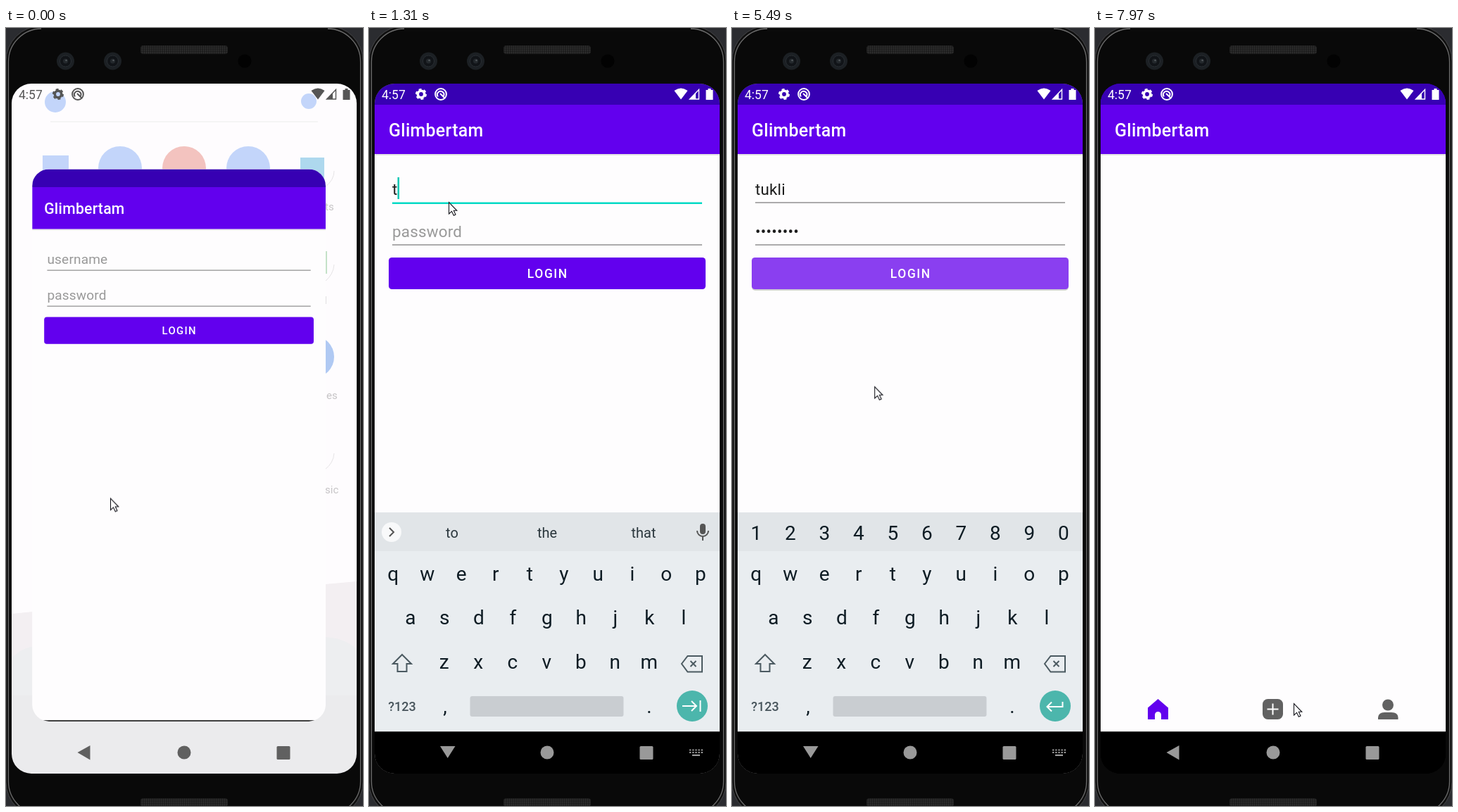
Write an HTML page that moves like this. It is 507x1105 px and loops after 8000 ms.

```html
<!DOCTYPE html>
<html lang="en">
<head>
<meta charset="utf-8">
<title>Login demo</title>
<style>
html, body { margin: 0; width: 100%; height: 100%; overflow: hidden; background: #2b2c30; }
body { position: relative; font-family: Roboto, sans-serif; }
svg { position: absolute; left: 0; top: 0; width: 507px; height: 1105px; }
.screen, .window { position: absolute; width: 490px; height: 980px; overflow: hidden; border-radius: 28px; }
.screen { left: 8px; top: 79px; background: #000; }
.screen svg { left: -8px; top: -79px; }
.window { left: 0; top: 0; transform-origin: 0 0; background: #fefdfe; }
.keys { position: absolute; left: 0; top: 0; width: 490px; height: 920px; overflow: hidden; }
.launcher, .login, .feed, #keyboard, .status, .nav, #button, .mouse { animation: 8s linear infinite; }

.title { font: 500 24.9px Roboto, sans-serif; letter-spacing: .3px; fill: #fff; }
.field { font-size: 22.4px; letter-spacing: .2px; }
.hint { fill: #999; }
.caption { font: 500 17.46px Roboto, sans-serif; letter-spacing: 1.56px; fill: #fff; }
.line { fill: none; stroke: #909090; stroke-width: 1.4; }
.line.focus { stroke: #03dac5; stroke-width: 2.6; transform: translateY(.7px); }
.caret { fill: #03c8b5; }
.centre { text-anchor: middle; }
.key { font-size: 28px; fill: #0e1c24; }
.stroke { fill: none; stroke: currentColor; stroke-width: 2; }

.launcher { animation-name: launcher; }
@keyframes launcher { 0%, 3.6% { opacity: 1; } 3.7%, 100% { opacity: 0; } }
.login { animation-name: login; }
@keyframes login {
  0% { transform: translate(29.5px, 122.7px) scale(.849); height: 921.5px; animation-timing-function: cubic-bezier(.2, .6, .2, 1); }
  3.6% { transform: none; height: 980px; }
  84.375% { transform: none; height: 980px; animation-timing-function: cubic-bezier(.3, 0, .8, .15); }
  85.21% { transform: translate(-4.9px, -9.8px) scale(1.02); height: 980px; animation-timing-function: cubic-bezier(.05, .7, .1, 1); }
  89.375%, 100% { transform: translate(-12.25px, -24.5px) scale(1.05); height: 980px; }
}
.feed { border-radius: 0; box-shadow: 0 0 3px rgba(0, 0, 0, .5); animation-name: feed; }
@keyframes feed {
  0%, 84.375% { transform: translate(36.75px, 73.5px) scale(.85); animation-timing-function: cubic-bezier(.3, 0, .8, .15); }
  85.21% { transform: translate(22.05px, 44.1px) scale(.91); animation-timing-function: cubic-bezier(.05, .7, .1, 1); }
  89.375%, 100% { transform: none; }
  0%, 85% { opacity: 0; }
  86%, 100% { opacity: 1; }
}
#keyboard { animation-name: keyboard; }
@keyframes keyboard {
  0%, 12.6% { transform: translateY(312px); animation-timing-function: cubic-bezier(0, 0, .2, 1); }
  15.8%, 83.6% { transform: none; animation-timing-function: cubic-bezier(.4, 0, 1, 1); }
  85.6%, 100% { transform: translateY(312px); }
}
.status { animation-name: status; }
@keyframes status { 0%, 1.2% { color: #555; } 3%, 100% { color: #fff; } }
.nav { animation-name: nav; }
@keyframes nav { 0%, 1% { color: #606060; } 5%, 13% { color: #d8d8d8; } 16%, 100% { color: #999; } }
#button { animation-name: button; }
@keyframes button {
  0%, 49.6% { fill: #6200ee; }
  49.9%, 78.9% { fill: #8a3ff0; }
  83.6%, 100% { fill: #6200ee; }
}
.mouse { animation-name: mouse; }
@keyframes mouse {
  0% { transform: translate(148px, 668px); }
  5% { transform: translate(140px, 480px); }
  8.75% { transform: translate(125px, 290px); }
  10.6% { transform: translate(118px, 228px); }
  11.7% { transform: translate(119px, 235px); }
  12.1% { transform: translate(121px, 251px); }
  13%, 51.9% { transform: translate(113px, 247px); }
  53% { transform: translate(154px, 317px); }
  56.2% { transform: translate(260px, 520px); }
  58.7% { transform: translate(304px, 640px); }
  60.6%, 62.7% { transform: translate(286px, 679px); }
  66.2% { transform: translate(240px, 600px); }
  70%, 73% { transform: translate(181px, 458px); }
  76.2% { transform: translate(215px, 390px); }
  78.1% { transform: translate(226px, 352px); }
  79.4% { transform: translate(228px, 358px); }
  80.6% { transform: translate(229px, 383px); }
  83.1% { transform: translate(120px, 640px); }
  85% { transform: translate(50px, 702px); }
  86.9% { transform: translate(35px, 707px); }
  88.7% { transform: translate(36px, 720px); }
  91.2% { transform: translate(130px, 890px); }
  93.5% { transform: translate(193px, 942px); }
  93.9%, 96.2% { transform: translate(193px, 939px); }
  99.6%, 100% { transform: translate(282px, 959px); }
}
</style>
</head>
<body>
<!-- phone body -->
<svg viewBox="0 0 507 1105">
  <defs>
    <pattern id="mesh" width="3" height="3" patternUnits="userSpaceOnUse">
      <rect width="3" height="3" fill="#1b1b1b"/><circle cx="1.5" cy="1.5" r="1" fill="#353535"/>
    </pattern>
  </defs>
  <rect x="0" y="-3" width="507" height="1124" rx="50" fill="#101010" stroke="#454547"/>
  <rect x="3.5" y="1" width="500" height="1116" rx="47" fill="#090909" stroke="#6c6c6c" stroke-width="1.3"/>
  <path d="M50 0H457V5H50Z" fill="#0b0b0b"/>
  <rect x="191" y="25" width="124" height="12" rx="4" fill="url(#mesh)"/>
  <rect x="191" y="1094" width="124" height="12" rx="4" fill="url(#mesh)"/>
  <g id="cameras"></g>
  <circle cx="339" cy="47" r="9.5" fill="#020202"/>
</svg>

<div class="screen">
  <svg class="launcher" viewBox="0 0 507 1105">
    <path d="M8 79H498V1059H8Z" fill="#fefcfe"/>
    <path d="M8 832L38 829 200 812 453 790 498 786V1059H8Z" fill="#f3eff2"/>
    <path d="M8 895Q30 872 60 880T440 866Q475 862 498 882V1059H8Z" fill="#edeef0"/>
    <path d="M8 948H498V1059H8Z" fill="#ebebed"/>
    <path d="M63 133H443" stroke="#ececec"/>
    <g fill="#c3d5fa">
      <circle cx="70" cy="105" r="15"/><circle cx="430" cy="104" r="11"/>
      <path d="M52 181H89V218H52Z"/><circle cx="162" cy="199" r="31"/>
      <circle cx="253" cy="199" r="31" fill="#f3c3bf"/><circle cx="344" cy="199" r="31"/>
      <path d="M418 184H452V218H418Z" fill="#aed8ee"/>
      <path d="M436 317H456V349H436Z" fill="#c4e2c8"/>
      <circle cx="436" cy="467" r="30" fill="#b0c9f3"/>
    </g>
    <path d="M466 203Q466 216 453 226M466 336Q465 350 453 360M466 604Q465 618 453 627" fill="none" stroke="#e6e4e6"/>
    <g font-size="15" fill="#c6c4c6">
      <text x="453" y="259">ts</text><text x="452" y="392">l</text><text x="455" y="527">es</text><text x="453" y="661">sic</text>
    </g>
  </svg>

  <div class="window login">
    <svg viewBox="0 0 507 1105">
      <g id="appBar">
        <path d="M8 179H498V181H8Z" opacity=".1"/>
        <path d="M8 79H498V109H8Z" fill="#3700b3"/>
        <path d="M8 109H498V179H8Z" fill="#6200ee"/>
        <text class="title" x="28" y="153.5">Glimbertam</text>
        <path d="M8 999.3H498V1060H8Z"/>
      </g>
      <text class="field hint" id="userHint" x="33" y="237">username</text>
      <text class="field" id="user" x="33" y="237" fill="#1c1c1c"></text>
      <path class="line" id="userLine" d="M33 248H473"/>
      <rect class="caret" id="userCaret" y="212" width="2.5" height="31"/>
      <text class="field hint" id="passHint" x="33" y="297">password</text>
      <text class="field" id="pass" x="33" y="297" fill="#1c1c1c"></text>
      <path class="line" id="passLine" d="M33 308H473"/>
      <rect class="caret" id="passCaret" y="272" width="2.5" height="31"/>
      <rect id="lift" x="28" y="329" width="450" height="44" rx="5" opacity=".18"/>
      <rect id="button" x="28" y="326" width="450" height="45" rx="4.5"/>
      <text class="caption centre" x="253.8" y="355">LOGIN</text>
    </svg>
  </div>

  <div class="keys">
    <svg id="keyboard" viewBox="0 0 507 1105">
      <path d="M8 688H498V1000H8Z" fill="#e9edf0"/>
      <path d="M8 688H498V743H8Z" fill="#e1e5e8"/>
      <g id="digits"></g>
      <g id="strip">
        <circle cx="32" cy="716" r="14" fill="#f8f9fa"/>
        <path d="M29 710l6 6-6 6" fill="none" stroke="#555" stroke-width="2"/>
        <g id="words" font-size="20" fill="#2b373d"></g>
        <rect x="470" y="704" width="8" height="15" rx="4" fill="#555"/>
        <path d="M466 714a8 8 0 0 0 16 0M474 722V728" fill="none" stroke="#555" stroke-width="2"/>
      </g>
      <g id="letters"></g>
      <g class="stroke" color="#4b5a61">
        <path d="M47 890L60 903H53.5V914H40.5V903H34Z"/>
        <path d="M444 903L452.5 892H473V914.5H452.5ZM456.5 899l8 8m0-8l-8 8"/>
      </g>
      <text class="centre" x="47" y="970" font-size="18" font-weight="500" fill="#47545b">?123</text>
      <text class="key centre" x="108" y="973">,</text>
      <text class="key centre" x="398" y="973">.</text>
      <rect x="143.5" y="949" width="218" height="29" rx="3" fill="#c9cdd1"/>
      <circle cx="459" cy="963" r="22" fill="#4cb6ac"/>
      <g class="stroke" color="#fff">
        <path id="next" d="M445 963H465M458 956l7 7-7 7M470.5 955V971"/>
        <path id="enter" d="M469.5 957V964H448M454 957.5l-6.5 6.5 6.5 6.5"/>
      </g>
    </svg>
  </div>

  <div class="window feed">
    <svg viewBox="0 0 507 1105">
      <use href="#appBar"/>
      <path d="M89.5 953L104 965.5V982H94V975.5a4.5 4.5 0 0 0-9 0V982H75V965.5Z" fill="#6200ee"/>
      <g fill="#616161">
        <rect x="238" y="953" width="29" height="29" rx="7.5"/>
        <circle cx="416" cy="961.5" r="8"/>
        <path d="M402 982V979Q403 972 411 972H421Q430 972 430.5 979V982Z"/>
      </g>
      <path d="M244.5 967.5H260.5M252.5 959.5V975.5" stroke="#fff" stroke-width="2"/>
    </svg>
  </div>

  <svg viewBox="0 0 507 1105">
    <g class="status" fill="currentColor">
      <text x="18" y="100.5" font-size="17.5">4:57</text>
      <g class="stroke">
        <circle cx="74" cy="94" r="4.7" style="stroke-width:3.6"/>
        <circle cx="74" cy="94" r="7" stroke-dasharray="4 3.33"/>
        <circle cx="102" cy="94" r="7.9"/>
        <path d="M98 97.5A4.7 4.7 0 1 1 106 96.5M101 93L108 100"/>
        <path d="M468.5 87.5V101H455.5Z" style="stroke-width:1.4"/>
      </g>
      <path d="M433.5 89Q443 82 452.5 89L443 101.5Z"/>
      <path d="M464 92V101H456Z"/>
      <path d="M478.5 88H481.5V86H485.5V88H488.5V102H478.5Z"/>
    </g>
    <g class="nav" fill="currentColor">
      <path id="back" d="M101.5 1029L119.5 1019V1039.5Z"/>
      <g id="hide">
        <path d="M101 1020H122.5L111.7 1037Z"/>
        <path d="M455 1025.5H474M455 1029H474" fill="none" stroke="currentColor" stroke-width="2.2" stroke-dasharray="2.4 1.75"/>
        <path d="M459 1031.8H470V1034H459Z"/>
      </g>
      <circle cx="253" cy="1029" r="9.5"/>
      <rect x="384.5" y="1020" width="19" height="19" rx="1.5"/>
    </g>
  </svg>
</div>

<svg viewBox="0 0 507 1105">
  <path class="mouse" d="M.5 .5V17L4.5 13.3 7.3 19.3 10 18 7.3 12.3H11.8Z" fill="#fff" stroke="#15151c" stroke-width="1.1"/>
</svg>

<script>
const $ = id => document.getElementById(id);
const show = (id, on) => { $(id).style.display = on ? '' : 'none'; };
const within = (t, from, to) => t >= from && t < to;

const USER = 'tukli', USER_TIMES = [1230, 1340, 1990, 2060, 2140];
const PASS = 'password', PASS_TIMES = [2730, 2820, 2940, 3150, 3330, 3510, 3590, 3660];
const USER_FOCUS = 940, PASS_FOCUS = 2360, BUTTON_FOCUS = 3970, SUBMIT = 6690;
const SUGGESTIONS = ['I the you', 'to the that', 'tu the turn', 'tuk tuck tusk', 'tukl tuck talk', 'tukli tulip tuck'];

const keyRow = (chars, x, y) => [...chars].map((c, i) =>
  `<text class="key centre" x="${x + i * 48.5}" y="${y}">${c}</text>`).join('');
$('digits').innerHTML = keyRow('1234567890', 34.3, 727);
$('letters').innerHTML = keyRow('qwertyuiop', 34.3, 784.5) + keyRow('asdfghjkl', 58.8, 847) + keyRow('zxcvbnm', 106.8, 910);
$('words').innerHTML = [118, 253, 390].map(x => `<text class="centre" x="${x}" y="724"></text>`).join('');
$('cameras').innerHTML = [84.5, 151.5].map(x =>
  `<circle cx="${x}" cy="47" r="12.5" fill="#1c2024"/><circle cx="${x}" cy="47" r="8" fill="#111418" stroke="#292e33"/>
   <circle cx="${x}" cy="47" r="3.5" fill="#23282c"/><circle cx="${x + 1}" cy="46" r="1.2" fill="#555a5e"/>`).join('');

const countAt = (times, t) => times.filter(at => at <= t).length;

function drawField(id, text, focused, caretOn) {
  const node = $(id);
  if (node.textContent !== text) node.textContent = text;
  show(id + 'Hint', !text);
  $(id + 'Line').classList.toggle('focus', focused);
  show(id + 'Caret', caretOn);
  $(id + 'Caret').setAttribute('x', 33 + (text ? node.getComputedTextLength() : 0));
}

function draw(t) {
  const userCount = countAt(USER_TIMES, t), passCount = countAt(PASS_TIMES, t);
  const userFocus = within(t, USER_FOCUS, PASS_FOCUS), passFocus = within(t, PASS_FOCUS, BUTTON_FOCUS);

  // the newest password letter stays readable while the field has focus
  const hidden = passFocus ? Math.max(passCount - 1, 0) : passCount;
  drawField('user', USER.slice(0, userCount), userFocus, userFocus && !within(t, 1840, 1990));
  drawField('pass', '•'.repeat(hidden) + PASS.slice(hidden, passCount), passFocus, passFocus);
  $('userHint').style.fill = userFocus ? '#757575' : '';

  const words = SUGGESTIONS[userCount].split(' ');
  [...$('words').children].forEach((node, i) => { node.textContent = words[i]; });
  show('strip', t < PASS_FOCUS);
  show('digits', t >= PASS_FOCUS);
  show('next', t < BUTTON_FOCUS);
  show('enter', t >= BUTTON_FOCUS);
  show('lift', within(t, BUTTON_FOCUS, 6310));

  const typing = within(t, 1100, SUBMIT);
  show('hide', typing);
  show('back', !typing);
}

let start;
function tick(now) {
  start ??= now;
  draw((now - start) % 8000);
  requestAnimationFrame(tick);
}
draw(0);
requestAnimationFrame(tick);
</script>
</body>
</html>
```
